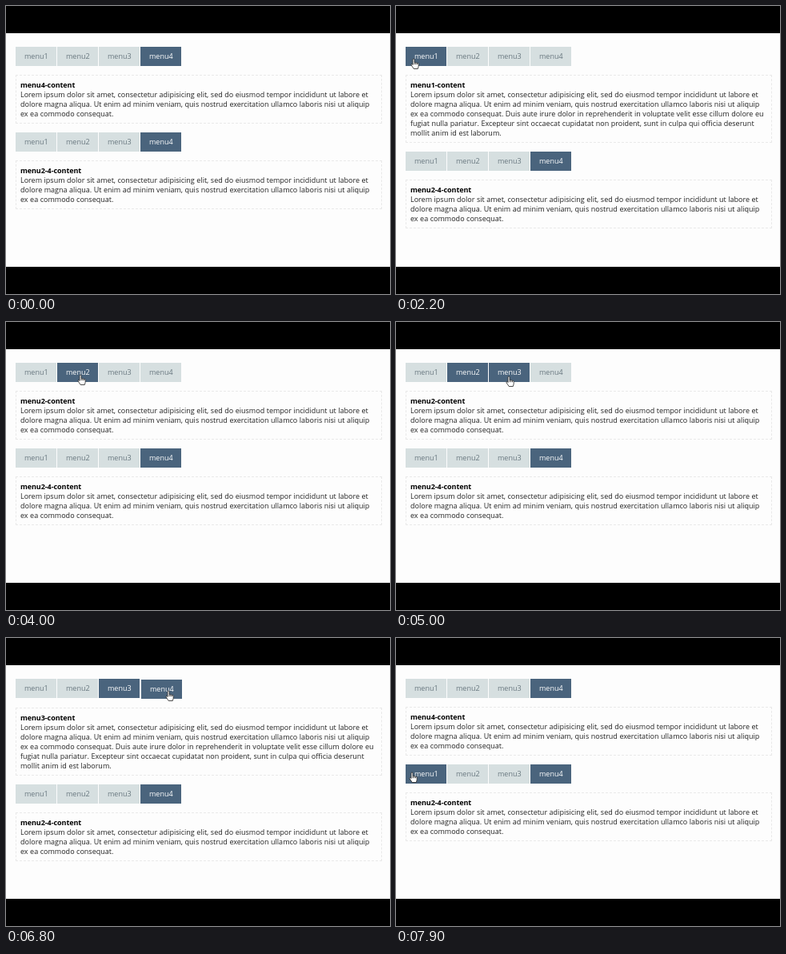
Write an HTML page that moves like this. It is 480 px wide and 360 px high and loops after 8000 ms.

```html
<!DOCTYPE html>
<html lang="en">
<head>
<meta charset="utf-8">
<title>Tab menus</title>
<style>
  html, body { margin: 0; width: 100%; height: 100%; overflow: hidden; background: #000; }
  #stage {
    position: absolute; left: 0; top: 0; width: 480px; height: 360px; overflow: hidden;
    font: 9px/12px "Open Sans", "Noto Sans", sans-serif; color: #222;
  }
  #page { position: absolute; top: 34px; width: 480px; height: 292px; background: #fdfdfd; }
  #page > div { position: absolute; left: 12px; top: 17px; width: 458px; }
  .menu { display: flex; gap: 1px; height: 24px; margin-bottom: 11px; }
  .menu.pressed { padding-bottom: 1px; }
  .tab {
    box-sizing: border-box; width: 51px; height: 24px; padding-left: 11px;
    line-height: 24px; background: #d6dfe0; color: #68777f;
  }
  .tab.on { background: #4a647d; color: #fff; }
  .tab.down { transform: translate(1px, 1px); }
  .panel {
    margin-bottom: 11px; padding: 6px 5px 5px; border: 1px dashed #e9e9e9;
    white-space: pre; word-spacing: .2px;
  }
  .panel b { display: block; color: #000; letter-spacing: -.07px; }
  #cursor { position: absolute; left: 0; top: 0; overflow: visible; }
  #cursor path { fill: #fff; stroke: #222; stroke-width: .8; stroke-linejoin: round; }
</style>
</head>
<body>
<div id="stage">
  <div id="page"><div>
    <div class="menu"></div>
    <div class="panel"><b></b><span></span></div>
    <div class="menu"></div>
    <div class="panel"><b></b><span></span></div>
  </div></div>
  <svg id="cursor" width="12" height="14">
    <path id="arrow" d="M0 0v10l2.3-2 1.6 3.5 1.6-.7L4 7.4h3z"/>
    <g id="hand">
      <path d="M-1 1.2q0-1.2 1-1.2t1 1.2v3.6q1-.7 1.8.2 1-.5 1.7.4 1.5-.4 1.7 1v2.8L5.3 12.5H.2L-2.8 8q-.6-1.2.3-1.5.7-.1 1.5 1z"/>
      <path d="M1 5v2.2M2.8 5.2v2M4.5 5.6v1.6"/>
    </g>
  </svg>
</div>
<script>
  const LOOP = 8000, STEP = 100;
  const SHORT = `Lorem ipsum dolor sit amet, consectetur adipisicing elit, sed do eiusmod tempor incididunt ut labore et
dolore magna aliqua. Ut enim ad minim veniam, quis nostrud exercitation ullamco laboris nisi ut aliquip
ex ea commodo consequat.`;
  const LONG = SHORT + ` Duis aute irure dolor in reprehenderit in voluptate velit esse cillum dolore eu
fugiat nulla pariatur. Excepteur sint occaecat cupidatat non proident, sunt in culpa qui officia deserunt
mollit anim id est laborum.`;

  // Cursor moves: start, end, and the point reached
  const start = [-3, 65];
  const moves = [
    { from: 1600, to: 1800, at: [22, 66] },
    { from: 3200, to: 3800, at: [93, 66] },
    { from: 4500, to: 5000, at: [141, 68] },
    { from: 6300, to: 6800, at: [203, 66] },
    { from: 7300, to: 7900, at: [20, 168] }
  ];
  const clicks = [[0, 4], [2000, 1], [4000, 2], [5200, 3], [6900, 4]];
  const presses = [[3900, 4000, 2], [6800, 6900, 4]];

  const $ = id => document.getElementById(id);
  const menus = [...document.querySelectorAll(".menu")];
  const panels = [...document.querySelectorAll(".panel")];
  const tabs = menus.map(menu => [1, 2, 3, 4].map(n => {
    const tab = document.createElement("div");
    tab.className = "tab";
    tab.textContent = "menu" + n;
    return menu.appendChild(tab);
  }));

  function setPanel(panel, title, text) {
    panel.children[0].textContent = title + "-content";
    panel.children[1].textContent = text;
  }

  function cursorAt(t) {
    let pos = start;
    for (const { from, to, at } of moves) {
      if (t < from) break;
      const p = Math.min(1, (t - from) / (to - from));
      const ease = p * p * (3 - 2 * p);
      pos = pos.map((v, i) => v + (at[i] - v) * ease);
    }
    return pos;
  }

  function hoveredTab([x, y], tops) {
    const menu = tops.findIndex(top => y >= top && y < top + 24);
    const n = Math.floor((x - 12) / 52) + 1;
    return menu >= 0 && n >= 1 && n <= 4 ? { menu, n } : null;
  }

  function render(t) {
    const selected = clicks.filter(([at]) => t >= at).pop()[1];
    const press = presses.find(([from, to]) => t >= from && t < to);
    const isLong = selected % 2 === 1;
    const pos = cursorAt(t);
    const hover = t >= 1600 ? hoveredTab(pos, [51, isLong ? 182 : 158]) : null;

    tabs.forEach((row, m) => row.forEach((tab, i) => {
      const n = i + 1;
      const active = n === (m ? 4 : selected);
      tab.classList.toggle("on", active || !!hover && hover.menu === m && hover.n === n);
      tab.classList.toggle("down", !m && !!press && press[2] === n);
    }));
    menus[0].style.height = press ? "25px" : "24px";
    setPanel(panels[0], "menu" + selected, isLong ? LONG : SHORT);

    $("cursor").style.display = t >= 1600 ? "" : "none";
    $("cursor").style.transform = `translate(${pos[0]}px, ${pos[1]}px)`;
    $("hand").style.display = hover ? "" : "none";
    $("arrow").style.display = hover ? "none" : "";
  }

  setPanel(panels[1], "menu2-4", SHORT);
  let origin = null, shown = -1;
  function frame(now) {
    origin ??= now;
    const t = Math.floor((now - origin) % LOOP / STEP) * STEP;
    if (t !== shown) render(shown = t);
    requestAnimationFrame(frame);
  }
  render(0);
  requestAnimationFrame(frame);
</script>
</body>
</html>
```
